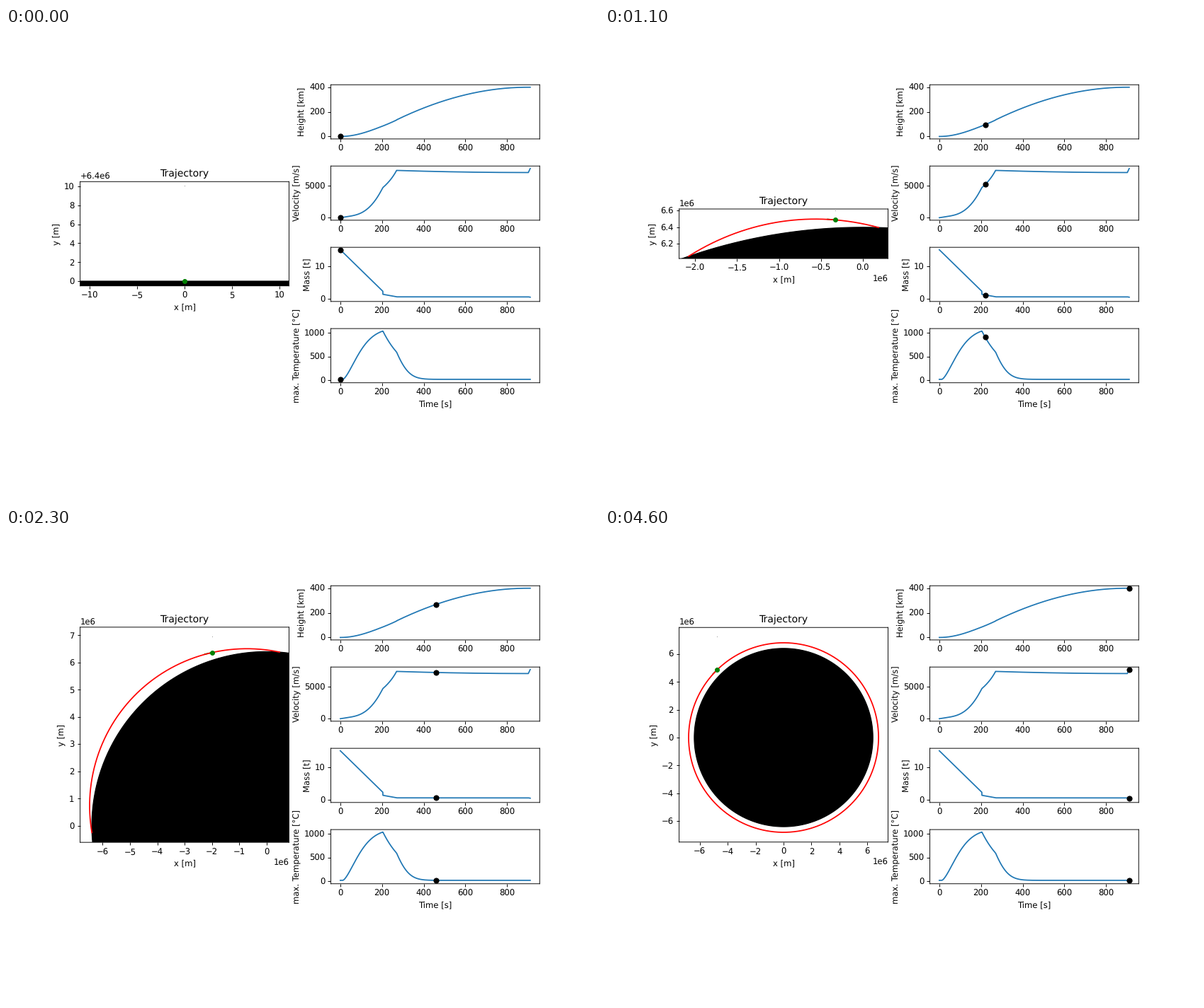
A matplotlib script that plays this animation: 837 by 669 pixels, repeating every 5.6 s.

```python
import numpy as np
import matplotlib.pyplot as plt
from matplotlib.animation import FuncAnimation

plt.rcParams.update({"path.snap": False, "text.hinting": "none"})

W, H, DPI = 837, 669, 83.7
MU, R = 3.986e14, 6.4e6
T_STAGE, T_BURNOUT, T_APO, T_END = 204, 270, 902, 911
DT, STEP = 0.5, 20            # seconds per sample, seconds per frame
MOVING, FRAMES = 46, 56       # the last picture is held


def integrate(f, x):
    return np.concatenate(([0], np.cumsum((f[1:] + f[:-1]) / 2 * np.diff(x))))


def polar(rad, a):
    return -rad * np.sin(a), rad * np.cos(a)


def temperature(t):
    """Drag heating, then two stages of cooling."""
    warm = 1091 * (1 - np.exp(-1.474 * (np.maximum(t - 12, 0) / 128) ** 1.5))
    slow = 1020 * np.exp(-(t - T_STAGE) / 115)
    s = np.maximum(t - T_BURNOUT, 0)
    fast = 575 * np.exp(-0.0175 * s - 1e-4 * s ** 2)
    return 20 + np.where(t <= T_STAGE, warm,
                         np.where(t <= T_BURNOUT, slow, fast))


def simulate():
    t = np.arange(0, T_END + DT / 2, DT)
    first, coast, burn = t <= T_STAGE, t > T_BURNOUT, t > T_APO
    mass = np.interp(t, [0, T_STAGE, T_STAGE + DT, T_BURNOUT, T_APO, T_END],
                     [15, 2.36, 1.43, 0.66, 0.66, 0.56])

    # powered ascent: radial and tangential speed
    u = t / T_STAGE
    w = (t - T_STAGE) / (T_BURNOUT - T_STAGE)
    gain = np.log(1.43 / mass) / np.log(1.43 / 0.66)
    vr = np.where(first, 655 * np.sin(np.pi / 2 * u), 655 + 163 * w)
    vt = np.where(first, 4650 * u ** 2.88, 4650 + 2663 * gain)
    r = R + integrate(vr, t)
    ang = integrate(vt / r, t)

    # coasting on an ellipse up to its apogee
    ecc, apo, apo_ang = 0.1576, 6.8e6, 0.767
    p = apo * (1 - ecc)
    mom = np.sqrt(MU * p)
    phi = np.linspace(0, 0.9, 4001)
    before = integrate((p / (1 - ecc * np.cos(phi))) ** 2 / mom, phi)
    f = np.interp(T_APO - t, before, phi)
    rc = p / (1 - ecc * np.cos(f))
    r = np.where(coast, rc, r)
    ang = np.where(coast, apo_ang - f, ang)
    vr = np.where(coast, MU / mom * ecc * np.sin(f), vr)
    vt = np.where(coast, mom / rc, vt)

    # circularising burn
    v_apo, v_circ = mom / apo, np.sqrt(MU / apo)
    late = t - T_APO
    vt = np.where(burn, v_apo + (v_circ - v_apo) * late / (T_END - T_APO), vt)
    ang = np.where(burn, apo_ang + late * (v_apo + v_circ) / 2 / apo, ang)
    return t, r, ang, vr, vt, mass


def orbit(rad, a, vr, vt):
    """Part of the current Kepler orbit that lies above the ground."""
    if vt <= 0:
        return np.array([]), np.array([])
    mom = rad * vt
    p = mom ** 2 / MU
    ec, es = p / rad - 1, vr * mom / MU
    e, nu = np.hypot(ec, es), np.arctan2(es, ec)
    c = 0.0
    if p / (1 + e) < R:
        c = np.arccos(np.clip((p / R - 1) / e, -1, 1))
    s = np.linspace(c, 2 * np.pi - c, 600)
    return polar(p / (1 + e * np.cos(s)), a + s - nu)


def ground_shape(x0, x1, y0):
    lo, hi = np.arcsin(np.clip([x0 / R, x1 / R], -1, 1))
    a = np.linspace(lo, hi, 500)
    x, top = R * np.sin(a), R * np.cos(a)
    low = np.minimum(np.maximum(-top, y0 - (x1 - x0) * 0.1), top)
    return np.column_stack([np.r_[x, x[::-1]], np.r_[top, low[::-1]]])


def padded(values):
    lo, hi = np.min(values), np.max(values)
    m = 0.05 * (hi - lo)
    return lo - m, hi + m


t, r, ang, vr, vt, mass = simulate()

fig = plt.figure(figsize=((W + 0.01) / DPI, (H + 0.01) / DPI), dpi=DPI)
fig.subplots_adjust(left=0.125, right=0.9, top=0.88, bottom=0.25,
                    wspace=0.2, hspace=0.5)

ax = fig.add_subplot(1, 2, 1)
ax.set_aspect("equal")
ax.set_title("Trajectory")
ax.set_xlabel("x [m]")
ax.set_ylabel("y [m]")
ground, = ax.fill([0, 1, 1], [0, 0, 1], color="black")
heading, = ax.plot([], [], "g-")
path, = ax.plot([], [], "r-")
rocket, = ax.plot([], [], "go", ms=5)
speck, = ax.plot([], [], "k,", alpha=0.4)

series = [((r - R) / 1e3, "Height [km]"),
          (np.hypot(vr, vt), "Velocity [m/s]"),
          (mass, "Mass [t]"),
          (temperature(t), "max. Temperature [°C]")]
dots = []
for n, (data, label) in enumerate(series):
    sub = fig.add_subplot(4, 2, 2 * n + 2)
    sub.plot(t, data)
    dots += sub.plot([0], [0], "ko")
    sub.set_ylabel(label)
sub.set_xlabel("Time [s]")


def update(frame):
    k = int(min(min(frame, MOVING) * STEP, T_END) / DT)
    for dot, (data, _) in zip(dots, series):
        dot.set_data([t[k]], [data[k]])

    h, a = r[k] - R, ang[k]
    x, y = polar(r[k], a)
    px, py = orbit(r[k], a, vr[k], vt[k])
    path.set_data(px, py)
    rocket.set_data([x], [y])

    # velocity direction, drawn as long as the height
    v = max(np.hypot(vr[k], vt[k]), 1e-9)
    dx = (-vr[k] * np.sin(a) - vt[k] * np.cos(a)) / v
    dy = (vr[k] * np.cos(a) - vt[k] * np.sin(a)) / v
    heading.set_data([x, x + h * dx], [y, y + h * dy])

    top = R + max(2 * h, 10)
    speck.set_data([x], [top])
    xlim = padded(np.r_[px, x - 10, x + 10])
    ylim = padded(np.r_[py, y, top])
    ax.set_xlim(xlim)
    ax.set_ylim(ylim)
    ground.set_xy(ground_shape(*xlim, ylim[0]))
    return [ground, heading, path, rocket, speck, *dots]


anim = FuncAnimation(fig, update, frames=FRAMES, init_func=lambda: update(0),
                     interval=100, repeat=True, repeat_delay=0, blit=False)
plt.show()
```
